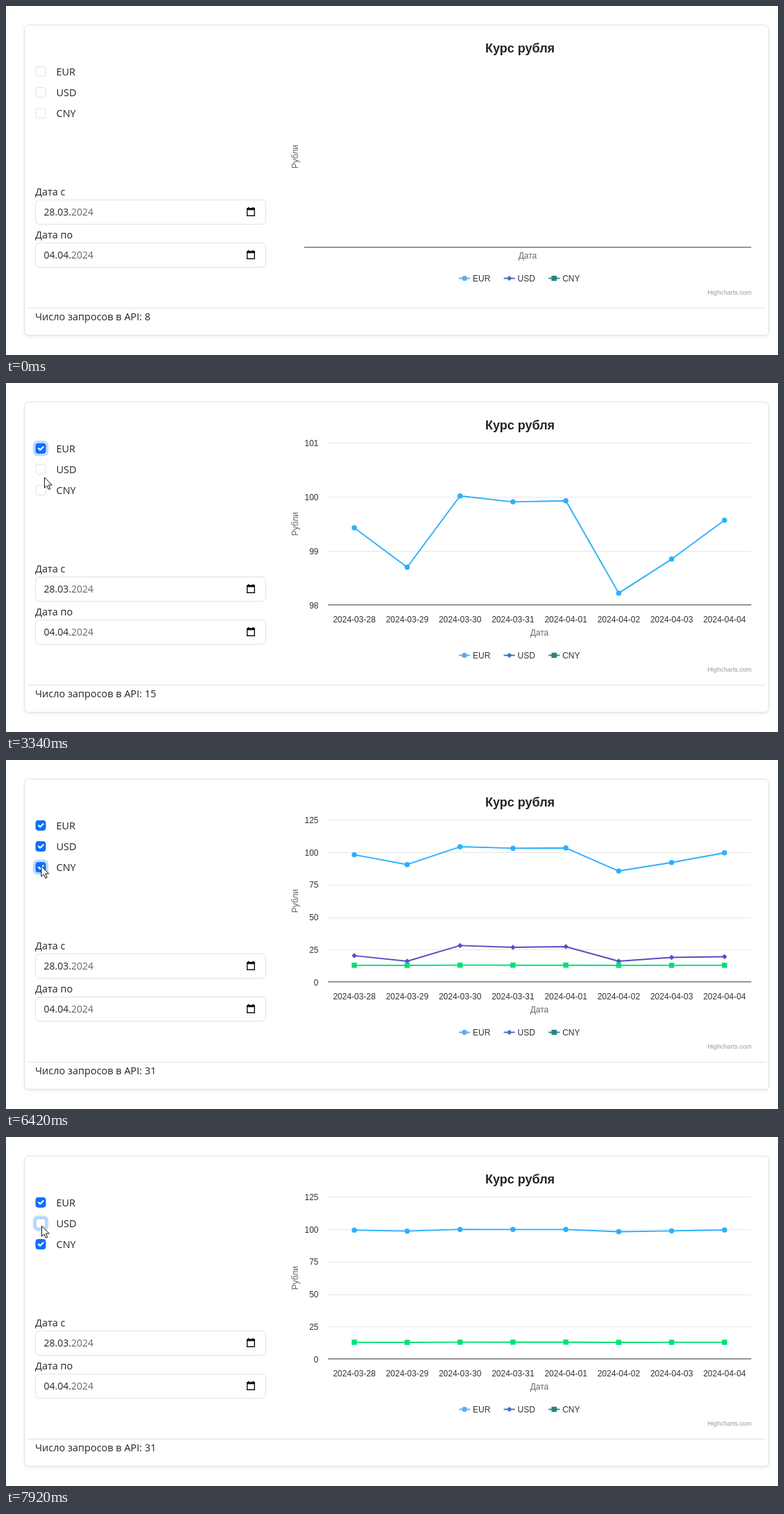
Write an HTML page that moves like this. It is 1113 px wide and 503 px high and loops after 8 s.

```html
<!DOCTYPE html>
<html lang="ru">
<head>
<meta charset="utf-8">
<title>Курс рубля</title>
<style>
  html, body { margin: 0; width: 100%; height: 100%; overflow: hidden; background: #fff; }
  svg { display: block; width: 100vw; height: 100vh; }
  .ui { font: 14.5px "Open Sans", "Noto Sans", sans-serif; fill: #212529; }
  .date { font-size: 14px; }
  .chart { font: 12px "Liberation Sans", Arial, sans-serif; fill: #333; }
  .muted { fill: #666; }
  .mid { text-anchor: middle; }
  .end { text-anchor: end; }
  .box { fill: #fff; stroke: #dee2e6; }
  .focus { stroke: #86b7fe; }
  .on { fill: #0d6efd; stroke: #0d6efd; }
  .ring { fill: #0d6efd; fill-opacity: .25; }
  .tick { fill: none; stroke: #fff; stroke-width: 2.2; stroke-linecap: round; stroke-linejoin: round; }
  .line { fill: none; stroke-width: 1.9; stroke-linejoin: round; }
  .card { filter: drop-shadow(0 2px 2px rgba(0, 0, 0, .075)); }
</style>
</head>
<body>
<svg viewBox="0 0 1113 503" xmlns="http://www.w3.org/2000/svg">
  <rect class="box card" x="26.5" y="27.5" width="1073" height="447" rx="6"/>
  <path d="M31 435.5H1095" stroke="#dee2e6"/>
  <g class="ui">
    <g id="checks"></g>
    <g id="inputs"></g>
    <text id="count" x="42" y="453"></text>
  </g>
  <g class="chart">
    <text class="mid" x="741" y="66.5" font-size="18" font-weight="bold" fill="#212529">Курс рубля</text>
    <g id="axes"></g>
    <g id="lines"></g>
    <g id="legend"></g>
    <text class="end" x="1075" y="415.5" font-size="9.2" fill="#999">Highcharts.com</text>
  </g>
  <path id="cursor" d="M.5 .5V15.8L4 12.5L6.4 18L8.8 17L6.4 11.6H11.2Z" fill="#fff" stroke="#111" stroke-linejoin="round"/>
</svg>
<script>
const LOOP = 8000, REDRAW = 500, DAYS = 8;
const LEFT = 464, EMPTY_LEFT = 430, RIGHT = 1074;
const TOP = 86.5, BASE = 320, EMPTY_BASE = 348;
const GAP = (RIGHT - LEFT) / DAYS;

const usd = [91.95, 91.54, 92.70, 92.57, 92.62, 91.54, 91.82, 91.87];

// Each series is clicked on, then loaded, which also sets a new axis range
const series = [
  { name: 'EUR', color: '#2caffe', key: '#62abea', mark: 'circle', click: 2030, load: 2300,
    axis: { lo: 98, hi: 101, step: 1 }, data: [99.43, 98.70, 100.02, 99.91, 99.93, 98.22, 98.85, 99.57] },
  { name: 'USD', color: '#544fc5', key: '#3b72c4', mark: 'diamond', click: 4400, load: 4688, off: 7840,
    axis: { lo: 90, hi: 102, step: 2 }, data: usd },
  { name: 'CNY', color: '#00e272', key: '#2a8383', mark: 'square', click: 6150, load: 6415,
    axis: { lo: 0, hi: 125, step: 25 }, data: usd.map(v => v * .1405) }
];

// Time and focused checkbox
const focusKeys = [[0, -1], [2030, 0], [3670, -1], [4400, 1], [6150, 2], [7840, 1]];

// Time and place of the pointer's turning points
const path = [
  [860, 77, 311], [930, 1, 197], [1200, 4, 114], [1960, 53, 92.5], [2600, 53, 92.5],
  [3340, 55, 135.5], [3540, 53.5, 126], [4140, 54, 133], [4470, 50, 130], [5000, 50, 130],
  [5220, 51, 152], [7240, 50, 152.5], [7840, 51, 127.5]
];

const $ = id => document.getElementById(id);
const lerp = (a, b, p) => a + (b - a) * p;
const clamp = p => Math.max(0, Math.min(1, p));
const ease = p => (1 - Math.cos(Math.PI * clamp(p))) / 2;
const toX = i => LEFT + GAP * (i + .5);
const toY = (v, axis) => lerp(BASE, TOP, (v - axis.lo) / (axis.hi - axis.lo));
const text = (x, y, str, cls = '', extra = '') => `<text x="${x}" y="${y}" class="${cls}" ${extra}>${str}</text>`;
const active = (s, t, start) => t >= start && t < (s.off || LOOP);

function marker(kind, x, y, color) {
  const r = 3.75;
  if (kind === 'circle') return `<circle cx="${x}" cy="${y}" r="${r}" fill="${color}"/>`;
  if (kind === 'square') return `<path d="M${x - r} ${y - r}h${2 * r}v${2 * r}h${-2 * r}z" fill="${color}"/>`;
  return `<path d="M${x} ${y - r}l${r} ${r}l${-r} ${r}l${-r} ${-r}z" fill="${color}"/>`;
}

function dateInput(label, day, y) {
  return text(42, y - 6.5, label) + `
    <rect class="box" x="42.5" y="${y}" width="332" height="35" rx="5.6"/>
    <text class="date" x="54.5" y="${y + 22.5}">${day}<tspan class="muted">2024</tspan></text>
    <path d="M347.7 ${y + 12.2}h10.6v10.6h-10.6z" fill="none" stroke="#111" stroke-width="1.4"/>
    <path d="M347 ${y + 11.5}h12v3.3h-12zm2 -1.3h1.6v2h-1.6zm6.4 0h1.6v2h-1.6z" fill="#111"/>`;
}

function legendItem(s, i) {
  const x = 661 + 64.6 * i, y = 392.5;
  return `<path d="M${x - 8} ${y}h16" stroke="${s.key}" stroke-width="1.9"/>` +
    marker(s.mark, x, y, s.key) + text(x + 12, y + 4.2, s.name);
}

function scaleLabels(axis) {
  let out = '';
  for (let v = axis.lo; v <= axis.hi; v += axis.step) {
    const y = toY(v, axis);
    if (v > axis.lo) out += `<path d="M${LEFT} ${Math.round(y - .01) + .5}H${RIGHT}" stroke="#e6e6e6"/>`;
    out += text(450.5, y + 4.5, v, 'end');
  }
  for (let i = 0; i < DAYS; i++) {
    const day = new Date(Date.UTC(2024, 2, 28 + i)).toISOString().slice(0, 10);
    out += text(toX(i), 344.7, day, 'mid');
  }
  return out;
}

function axes(axis) {
  const left = axis ? LEFT : EMPTY_LEFT, base = axis ? BASE : EMPTY_BASE;
  return (axis ? scaleLabels(axis) : '') +
    `<path d="M${left} ${base - .2}H${RIGHT + .5}" stroke="#333"/>` +
    text((left + RIGHT) / 2, 363.5, 'Дата', 'mid muted') +
    text(0, 0, 'Рубли', 'mid muted', `transform="translate(420.5 ${(TOP + base) / 2}) rotate(-90)"`);
}

function lines(t, latest) {
  if (latest < 0) return '';
  const now = series[latest], p = ease((t - now.load) / REDRAW);
  const shift = latest ? 0 : lerp(EMPTY_LEFT - LEFT, 0, p);
  return series.filter(s => active(s, t, s.load)).map(s => {
    const before = s === now ? now : series[latest - 1];
    const pts = s.data.map((v, i) => [toX(i) + shift, lerp(toY(v, before.axis), toY(v, now.axis), p)]);
    return `<polyline class="line" points="${pts.join(' ')}" stroke="${s.color}"/>` +
      pts.map(([x, y]) => marker(s.mark, x, y, s.color)).join('');
  }).join('');
}

function checkbox(s, i, t, focused) {
  const y = 94.3 + 30.15 * i, on = active(s, t, s.click);
  return (focused ? `<rect class="ring" x="38.8" y="${y - 11.2}" width="22.4" height="22.4" rx="7"/>` : '') +
    `<rect class="box ${focused ? 'focus' : ''} ${on ? 'on' : ''}" x="43" y="${y - 7}" width="14" height="14" rx="3.3"/>` +
    (on ? `<path class="tick" d="M47 ${y}l2.2 2.2l4.4 -4.4"/>` : '') +
    text(72.5, y + 5.5, s.name);
}

// One request per day of a loading series; the first day was already counted
function requests(t) {
  return series.reduce((n, s, i) => t < s.click ? n :
    Math.floor(lerp(n, DAYS * (i + 2) - 1, clamp((t - s.click) / (s.load - s.click)))), DAYS);
}

function movePointer(t) {
  const next = path.findIndex(k => k[0] > t);
  const b = path.at(next), a = next > 0 ? path[next - 1] : b;
  const p = a === b ? 0 : (t - a[0]) / (b[0] - a[0]);
  const outside = t < 860 || t >= 1000 && t < 1200;
  $('cursor').setAttribute('visibility', outside ? 'hidden' : 'visible');
  $('cursor').setAttribute('transform', `translate(${lerp(a[1], b[1], p)} ${lerp(a[2], b[2], p)})`);
}

const shown = {};
function put(id, html) {
  if (shown[id] !== html) $(id).innerHTML = shown[id] = html;
}

function render() {
  const t = performance.now() % LOOP;
  const latest = series.filter(s => t >= s.load).length - 1;
  const focus = focusKeys.filter(k => t >= k[0]).pop()[1];
  put('checks', series.map((s, i) => checkbox(s, i, t, i === focus)).join(''));
  put('count', 'Число запросов в API: ' + requests(t));
  put('axes', axes(series[latest]?.axis));
  put('lines', lines(t, latest));
  movePointer(t);
  requestAnimationFrame(render);
}

put('inputs', dateInput('Дата с', '28.03.', 279.5) + dateInput('Дата по', '04.04.', 341.5));
put('legend', series.map(legendItem).join(''));
render();
</script>
</body>
</html>
```
